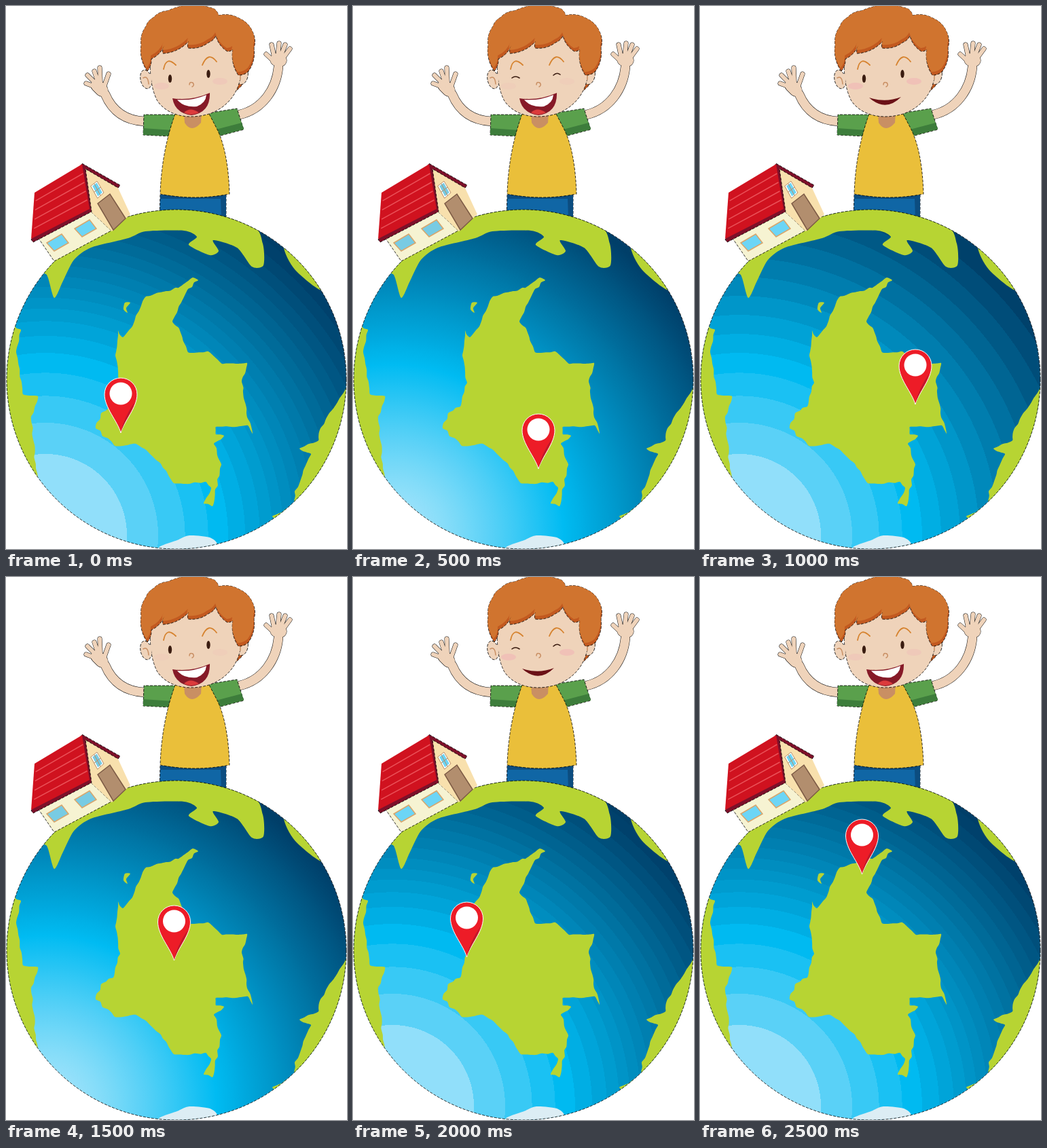
An HTML page for the animation above (3 s loop, 502 by 800 pixels).

```html
<!DOCTYPE html>
<html lang="en">
<head>
<meta charset="utf-8">
<title>Boy on a globe</title>
<style>
  html, body { margin: 0; width: 100%; height: 100%; overflow: hidden; background: #fff; }
  svg { display: block; width: 502px; height: 800px; }
  .edge { stroke: #000; stroke-width: .8; stroke-dasharray: 4 2; stroke-linejoin: round; }
  .limb path { fill: none; stroke-linecap: round; stroke-linejoin: round; }
  .skin { fill: #efd3ba; }
  .line { fill: none; stroke-linecap: round; }
</style>
</head>
<body>
<svg viewBox="0 0 502 800">
  <defs>
    <radialGradient id="sea" gradientUnits="userSpaceOnUse" cx="58" cy="780" r="600"></radialGradient>
    <clipPath id="disc"><circle cx="251" cy="550" r="250"/></clipPath>
    <clipPath id="hairClip"><path class="hair"/></clipPath>
    <g id="arms" class="limb">
      <path class="arm" d="M146 130Q162 168 204 170M344 160C378 152 398 122 401 90"/>
      <path class="palm" d="M134 117L141 124M398 79L404 80"/>
      <path class="finger" d="M134 120L118 114M134 116L120 102M136 114L130 96M139 114L138 91M144 120L151 100M395 82L383 71M395 76L391 57M400 75L402 55M404 75L411 57M407 78L418 63"/>
    </g>
  </defs>

  <!-- boy -->
  <g id="outlineArms"></g>
  <g id="skinArms"></g>
  <path class="edge" fill="#1066a5" d="M227 278L226 312H324V278Z"/>
  <path fill="#0c4d80" d="M227 278H324V312H317L316 284H227Z"/>
  <path class="edge" fill="#5aa04c" d="M252 160H203L202 190L242 192ZM296 158L340 151L350 182L312 192Z"/>
  <path fill="#3d7d3b" d="M202 180L246 183L242 191L202 190ZM309 182L347 172L350 181L314 191Z"/>
  <path class="edge" fill="#eabf3a" d="M249 159Q229 214 227 277Q278 287 329 277Q327 213 310 180L298 157Z"/>
  <path fill="#c98f63" d="M262 158L263 172Q273 188 287 172L288 157Z"/>
  <path class="edge" fill="#c2591f" d="M338 60H362Q364 84 355 100Q350 120 333 128Z"/>
  <g class="skin edge">
    <ellipse cx="206" cy="108" rx="8" ry="14" transform="rotate(-12 206 108)"/>
    <ellipse cx="348" cy="103" rx="8" ry="13" transform="rotate(14 348 103)"/>
    <path d="M214 60Q208 112 223 140C240 164 272 167 299 159C325 150 344 128 346 98L338 52L270 35Z"/>
  </g>
  <path class="skin" d="M204 100H214V116H207ZM340 94L350 96L344 110H338Z"/>
  <path class="line" stroke="#c98f63" stroke-width="1.5" d="M202 106Q209 102 210 115M352 100Q344 98 345 108M270 116Q270 111 275 113Q278 117 274 119"/>
  <path class="hair edge" fill="#c2591f"/>
  <g clip-path="url(#hairClip)"><path class="hair" fill="#d0742f" transform="translate(-1 -5)"/></g>
  <g id="cheeks" fill="#efbfb7">
    <ellipse cx="229" cy="118" rx="11" ry="5"/>
    <ellipse cx="315" cy="111" rx="11" ry="5"/>
  </g>
  <path class="line" stroke="#d6832f" stroke-width="1.8" d="M232 93Q236 73 250 87M289 87Q298 66 310 82"/>
  <g id="openEyes" fill="#3a1c10">
    <ellipse cx="241.5" cy="107" rx="2.7" ry="6"/>
    <ellipse cx="298" cy="100" rx="2.7" ry="6"/>
  </g>
  <path id="shutEyes" class="line" stroke="#3a1c10" stroke-width="1.6" d="M234 106Q239 102 245 106M295 102Q300 97 305 101"/>
  <g id="laugh">
    <path fill="#861a28" d="M245 136Q273 140 300 128Q301 157 273 161Q249 158 245 136Z"/>
    <path fill="#fff" d="M252 138Q274 140 295 131Q294 143 281 148Q262 150 252 138Z"/>
    <path fill="#dc3b3c" d="M262 157Q271 148 284 157Q272 163 262 157Z"/>
  </g>
  <path id="smile" fill="#6b1116" d="M249 135Q273 143 296 134Q273 157 249 135Z"/>

  <!-- globe -->
  <circle cx="251" cy="550" r="250" fill="url(#sea)"/>
  <g id="lands" clip-path="url(#disc)"></g>
  <circle class="edge" cx="251" cy="550" r="250" fill="none"/>

  <!-- house -->
  <path class="edge" fill="#f6f3d2" d="M47 341L122 300L155 331L71 376Z"/>
  <path fill="#f8e0ad" d="M114 236L164 266L183 307L156 332L124 302Z"/>
  <path class="edge" fill="#7d1029" d="M112 232L168 264L165 268L117 240L126 303L40 348L37 344Z"/>
  <path fill="#d0121f" d="M112 233L42 275L37 343L123 299Z"/>
  <path id="planks" class="line" stroke="#ea5158" stroke-width="1.5"/>
  <path fill="#b28e6e" stroke="#7c5a45" stroke-width="1.5" d="M135 291L153 277L176 313L158 330Z"/>
  <path class="glass" stroke="#fff" stroke-width="2" d="M126 265L134 259L143 275L135 282Z"/>
  <path class="line" stroke="#b88c60" d="M125 265L134 258L144 275L135 283ZM130 274L139 267M130 262L139 279"/>
  <path id="pane" class="glass" stroke="#d9a66c" stroke-width="1.5" d="M60 349L82 336L92 349L71 361Z"/>
  <use href="#pane" x="41" y="-21"/>

  <!-- map pin, tip at 0 0 -->
  <g id="pin">
    <path fill="#ed1c27" stroke="#fff" d="M0 0C-5-18-24-37-24-57A24 24 0 0 1 24-57C24-37 5-18 0 0Z"/>
    <path fill="#bd1a2b" d="M0 0Q4-22 20-45C16-31 5-17 0 0Z"/>
    <circle cy="-58" r="16.5" fill="#fff"/>
  </g>
</svg>
<script>
const $ = id => document.getElementById(id);
const all = selector => document.querySelectorAll(selector);
const parse = text => text.split(' ').map(pair => pair.split(',').map(Number));
const mix = (a, b, t) => a.map((v, k) => v + (b[k] - v) * t);

let seed = 7;
const random = () => (seed = seed * 16807 % 2147483647) / 2147483647;

// Closed smooth curve through points
function smooth(p) {
  const at = i => p[(i + p.length) % p.length];
  const handle = (a, from, to) => a.map((v, k) => v + (to[k] - from[k]) / 8);
  return 'M' + p[0] + p.map((a, i) => {
    const b = at(i + 1);
    return `C${handle(a, at(i - 1), b)} ${handle(b, at(i + 2), a)} ${b}`;
  }).join('') + 'Z';
}

// Shoreline: key points joined by short, randomly displaced steps
function coast(text, rough = 0, color = '#b7d433') {
  const keys = parse(text);
  const points = keys.flatMap((a, i) => {
    const b = keys[(i + 1) % keys.length];
    const steps = rough ? Math.ceil(Math.hypot(b[0] - a[0], b[1] - a[1]) / 9) : 1;
    return Array.from({ length: steps }, (_, n) =>
      mix(a, b, n / steps).map(v => n ? v + (random() - .5) * rough : v));
  });
  return `<path fill="${color}" d="${smooth(points)}"/>`;
}

$('lands').innerHTML = [
  coast('40,380 60,396 71,430 84,405 100,374 125,356 180,342 205,332 262,331 281,340 269,352 300,367 313,361 305,345 340,356 362,384 379,382 378,350 360,320 251,270'),
  coast('409,354 425,388 467,420 500,400 430,330'),
  coast('12,470 22,477 15,510 25,572 47,575 37,605 46,700 0,660 -10,520', 3),
  coast('510,548 463,622 460,640 432,652 449,660 425,715 425,735 392,752 430,790 530,680', 3),
  coast('175,437 183,437 177,445 179,452 173,447'),
  coast('275,400 283,404 268,417 252,451 245,465 257,481 268,510 298,509 318,527 355,526 347,553 354,600 363,630 356,618 339,620 309,620 309,631 321,633 306,645 317,675 304,737 291,733 302,710 294,701 270,704 247,703 231,680 212,660 191,645 160,648 132,622 140,600 158,590 168,555 161,515 165,478 172,488 186,472 206,428 236,420 254,415', 3),
  coast('225,799 252,787 270,780 300,783 310,795 270,815', 0, '#dcedf4')
].join('');

// Hair: every side of the outline bulges outwards like a lock
const tips = parse('208,96 199,58 206,30 217,17 238,7 306,4 313,14 343,18 363,38 365,62 357,96 342,102 334,64 326,67 309,44 298,54 268,62 269,52 231,70 233,58 214,78');
const locks = tips.map((a, i) => {
  const b = tips[(i + 1) % tips.length];
  const [x, y] = mix(a, b, .5);
  return `Q${x + (b[1] - a[1]) * .2} ${y - (b[0] - a[0]) * .2} ${b}`;
});
all('.hair').forEach(path => path.setAttribute('d', 'M' + tips[0] + locks.join('') + 'Z'));

$('planks').setAttribute('d', [.2, .4, .6, .8].map(t =>
  `M${mix([45, 273], [41, 341], t)}L${mix([111, 234], [121, 299], t)}`).join(''));

// Arms are stroked twice: a slightly wider black pass gives the outline
function arms(id, color, extra) {
  const group = $(id);
  group.append($('arms').cloneNode(true));
  Object.entries({ arm: 13, palm: 18, finger: 6 }).forEach(([part, width]) => {
    const { style } = group.querySelector('.' + part);
    style.stroke = color;
    style.strokeWidth = width + extra;
  });
}
arms('outlineArms', '#111', 1);
arms('skinArms', '#efd3ba', 0);

// Sea colour at a distance from the bright corner
const [glow, blue, deep] = [[172, 230, 251], [0, 187, 242], [0, 62, 104]];
const seaColor = r => `rgb(${(r < 252
  ? mix(glow, blue, (r / 252) ** 1.3)
  : mix(blue, deep, Math.min(1, (r - 252) / 290))).map(Math.round)})`;
const stop = (r, color) => `<stop offset="${r / 600}" stop-color="${color}"/>`;

function smoothSea() {
  let stops = '';
  for (let r = 0; r <= 600; r += 12) stops += stop(r, seaColor(r));
  return stops;
}
// Flat rings that get narrower outwards
function ringedSea(narrowest) {
  let stops = '';
  for (let r = 0, width = 120, next = 46; r < 600; r += width, width = Math.max(narrowest, next), next *= .86) {
    const color = seaColor(r + width / 2);
    stops += stop(r, color) + stop(r + width, color);
  }
  return stops;
}
const [plain, fine, coarse] = [smoothSea(), ringedSea(16), ringedSea(28)];

const pins = parse('169,629 273,682 317,587 247.5,565 167.5,560 238.5,438');
const show = (id, on) => $(id).style.display = on ? '' : 'none';
let current;
function draw(now) {
  const pose = Math.floor(now % 3000 / 500);
  if (pose !== current) {
    current = pose;
    const shut = pose % 3 === 1;
    const smile = pose === 2 || pose === 4;
    const soft = pose === 1 || pose === 3;
    $('pin').setAttribute('transform', `translate(${pins[pose]})`);
    $('sea').innerHTML = soft ? plain : pose === 2 ? coarse : fine;
    $('cheeks').style.opacity = smile ? .9 : soft ? .25 : .5;
    all('.glass').forEach(g => g.style.fill = soft ? '#78cbe3' : '#6cd5f6');
    show('openEyes', !shut);
    show('shutEyes', shut);
    show('laugh', !smile);
    show('smile', smile);
  }
  requestAnimationFrame(draw);
}
draw(performance.now());
</script>
</body>
</html>
```
